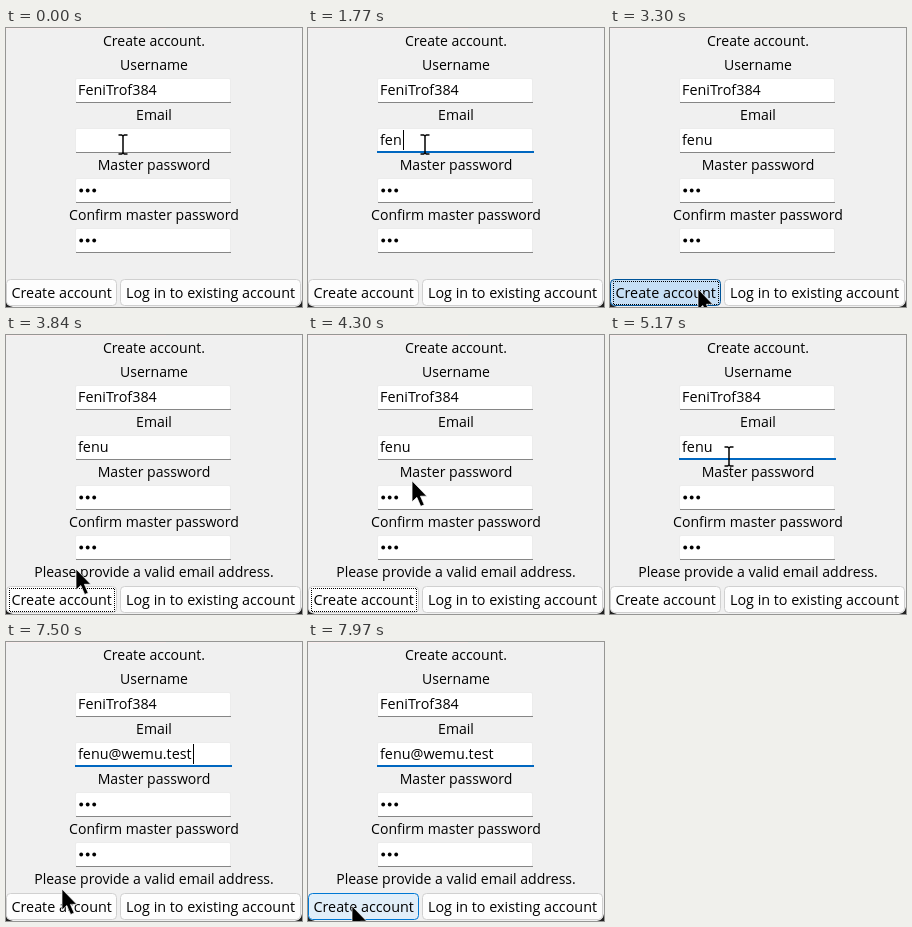
Recreate the animation shown at these times as an HTML page. Size 296 px wide and 279 px high, loop 8000 ms.

```html
<!DOCTYPE html>
<html lang="en">
<head>
<meta charset="utf-8">
<title>Create account</title>
<style>
  html, body { margin: 0; width: 100%; height: 100%; overflow: hidden; background: #f0f0f0; }
  svg { display: block; width: 296px; height: 279px; overflow: hidden; }
  text { font: 14.35px "Open Sans", "Noto Sans", sans-serif; fill: #000; white-space: pre; }
  .label, .caption { text-anchor: middle; }
  .label { font-size: 14.05px; }
  .field rect { fill: #fff; stroke: #ececec; }
  .field path { stroke: #868686; }
  .button { fill: #fdfdfd; stroke: #d0d0d0; }
  .button.hover { fill: #e0eef9; stroke: #0078d4; }
  .button.pressed { fill: #c6dff5; stroke: #005499; }
</style>
</head>
<body>
<svg viewBox="0 0 296 279">
  <defs>
    <g id="field" class="field">
      <rect x="69.5" y="0.5" width="155" height="24" rx="1.5"/>
      <path d="M70 24.5H225"/>
    </g>
    <g id="dots">
      <circle cx="75.2" r="1.9"/><circle cx="81.7" r="1.9"/><circle cx="88.2" r="1.9"/>
    </g>
  </defs>
  <rect width="296" height="279" fill="#f0f0f0"/>
  <path d="M0 .5H160" stroke="#faeeee"/>
  <path d="M0 272v7h7q-6-1-7-7zM296 272v7h-7q6-1 7-7z" fill="#222"/>

  <text class="label" x="148" y="18">Create account.</text>
  <text class="label" x="148" y="42">Username</text>
  <text class="label" x="148" y="92">Email</text>
  <text class="label" x="148" y="142">Master password</text>
  <text class="label" x="148" y="192">Confirm master password</text>
  <text class="label" x="148" y="242" id="message">Please provide a valid email address.</text>

  <use href="#field" y="50"/>
  <use href="#field" y="100"/>
  <use href="#field" y="150"/>
  <use href="#field" y="200"/>
  <text x="72" y="67">FeniTrof384</text>
  <text x="72" y="117" id="email"></text>
  <use href="#dots" y="162.5"/>
  <use href="#dots" y="212.5"/>
  <path id="underline" d="M69 124H226" stroke="#0067c0" stroke-width="2"/>
  <rect id="caret" y="102" width="1" height="20"/>

  <rect id="create" class="button" x="0.5" y="251.5" width="110" height="26" rx="4"/>
  <rect class="button" x="114.5" y="251.5" width="180" height="26" rx="4"/>
  <rect id="focusRing" x="3.5" y="253.5" width="105" height="23" fill="none" stroke="#000"
    stroke-dasharray="1 1" stroke-dashoffset=".5"/>
  <text class="caption" x="55.7" y="270">Create account</text>
  <text class="caption" x="204.5" y="270">Log in to existing account</text>

  <path id="beam" fill="none" stroke="#000" stroke-width="1.5"
    d="M-4.5-9.5h3.2l1.3 1 1.3-1h3.2M0-8.5v17M-4.5 9.5h3.2l1.3-1 1.3 1h3.2"/>
  <path id="arrow" stroke="#fff" stroke-width=".7" d="M0 0v21l4.8-4.5 3.9 9 3.5-1.6-3.8-8.6h6.4z"/>
</svg>
<script>
const LOOP = 8000;
const ADDRESS = "fenu@wemu.test";
const KEY_TIMES = [1240, 1570, 1770, 1900, 5370, 5500, 5570, 5700, 6040, 6240, 6440, 6570, 6640, 6770];
const FOCUS_SPANS = [[500, 3300], [4570, LOOP]];
const CARET_ON = 600, CARET_CYCLE = 905;
const POINTER_STEP = 200 / 3;
// Pointer path: time, x, y
const POINTER = [
  [2640, 117, 116.5], [2830, 116, 155], [3030, 101, 225], [3230, 88, 261],
  [3720, 88, 261], [3830, 70, 234], [4100, 88, 172], [4480, 119, 121.5],
  [7370, 119, 121.5], [7430, 91, 186], [7496, 56, 247], [7700, 47, 259], [7960, 44, 264]
];

const el = id => document.getElementById(id);
const show = (id, visible) => { el(id).style.display = visible ? "" : "none"; };
const place = (id, x, y) => el(id).setAttribute("transform", `translate(${x} ${y})`);
const within = (t, from, to) => t >= from && t < to;

function pointerAt(time) {
  const t = Math.floor((time - 30) / POINTER_STEP) * POINTER_STEP + 30;
  const next = POINTER.findIndex(point => point[0] > t);
  if (next === 0) return POINTER[0].slice(1);
  if (next < 0) return POINTER[POINTER.length - 1].slice(1);
  const a = POINTER[next - 1], b = POINTER[next];
  const k = (t - a[0]) / (b[0] - a[0]);
  return [1, 2].map(i => a[i] + (b[i] - a[i]) * k);
}

function draw(t) {
  const email = el("email");
  const typed = ADDRESS.slice(0, KEY_TIMES.filter(key => key <= t).length);
  if (email.textContent !== typed) email.textContent = typed;

  const focus = FOCUS_SPANS.find(([from, to]) => within(t, from, to));
  const caretOn = focus && (t - focus[0]) % CARET_CYCLE < CARET_ON;
  show("underline", focus);
  show("caret", caretOn);
  el("caret").setAttribute("x", Math.round(73 + (typed ? email.getComputedTextLength() : 0)));

  const [x, y] = pointerAt(t);
  const overEmail = within(x, 69, 226) && within(y, 100, 126);
  const overCreate = within(x, 1, 111) && within(y, 251, 278);
  show("beam", overEmail);
  show("arrow", !overEmail);
  place("beam", x, y);
  place("arrow", x, y);

  const pressed = within(t, 3300, 3440);
  el("create").setAttribute("class", "button" + (pressed ? " pressed" : overCreate ? " hover" : ""));
  show("focusRing", within(t, 3300, 4570));
  show("message", t >= 3440);
}

const start = performance.now();
function tick() {
  draw((performance.now() - start) % LOOP);
  requestAnimationFrame(tick);
}
tick();
</script>
</body>
</html>
```
